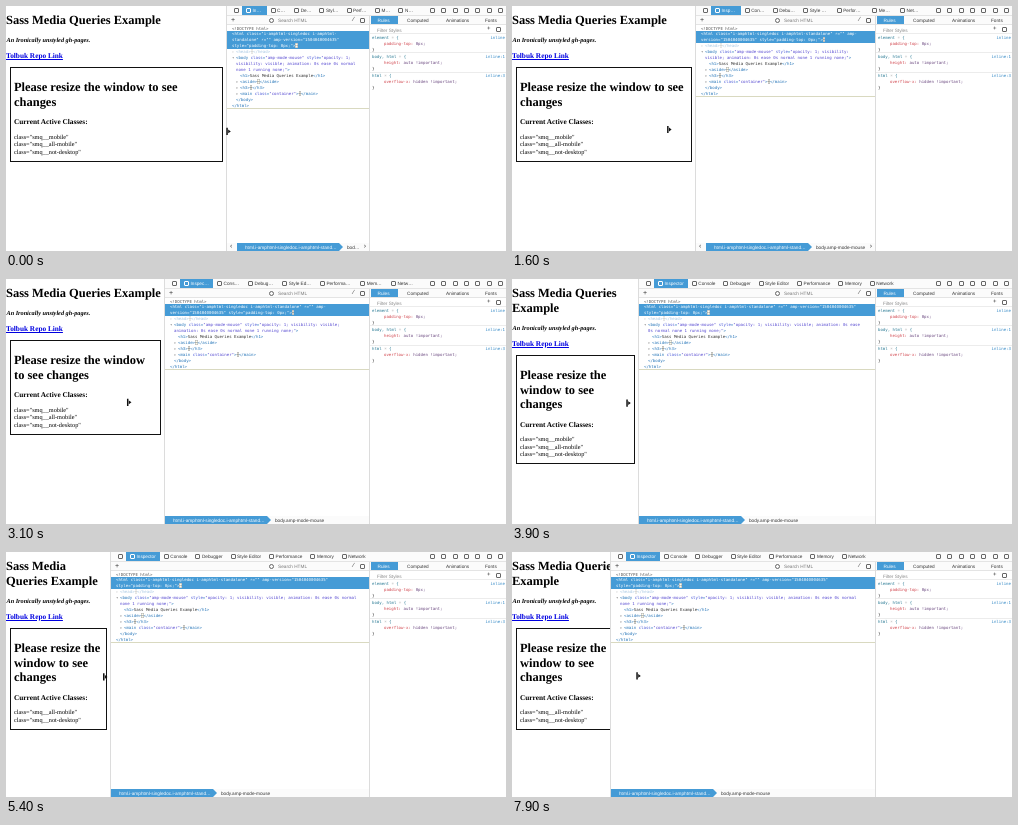
Recreate the animation shown at these times as an HTML page. Size 500 px wide and 245 px high, loop 8 s.

```html
<!DOCTYPE html>
<html lang="en">
<head>
<meta charset="utf-8">
<title>Resizing a page beside the inspector</title>
<style>
  html, body { margin: 0; width: 100%; height: 100%; overflow: hidden; background: #fff; }
  *, *::before { box-sizing: border-box; }
  #stage { position: absolute; left: 0; top: 0; width: 500px; height: 245px; overflow: hidden; background: #fff; text-rendering: geometricPrecision; }

  #page { position: absolute; left: 0; top: 0; color: #000; font: 6.24px/7.4px "Liberation Serif", serif; }
  #page h1, #page h2, #page h3, #page h4 { margin: 0; }
  #page h1, #page h2 { font-size: 12.48px; line-height: 14.7px; }
  #page h1 { padding-top: 7.1px; }
  #page h3, #page h4 { line-height: 8.4px; white-space: nowrap; }
  #page h3 { font-size: 7.3px; }
  #page h4 { font-size: 6.24px; font-style: italic; padding: 9.4px 0 6.7px .5px; }
  #page a { color: #0000e0; text-decoration: underline; }
  #box { margin: 6.6px 3.2px 0 4px; padding: 11.9px 3px 4.5px; border: 1px solid #111; }
  #box h3 { margin: 8.9px 0 7px; }
  #box div { white-space: nowrap; }

  #tools { position: absolute; top: 0; right: 0; height: 245px; background: #fff; border-left: 1px solid #dcdcdc; font: 4.7px/7px "Liberation Sans", Arial, sans-serif; color: #333; overflow: hidden; }
  #tools div { position: absolute; white-space: nowrap; }
  #tools .bar { left: 0; right: 0; background: #fbfbfb; border-bottom: 1px solid #e4e4e4; }
  #tools .tabs { left: 15px; right: 88px; top: 0; height: 9px; display: flex; }
  #tools .tab { position: relative; flex: 0 1 auto; min-width: 0; height: 9px; padding: 1px 4px 0 10.5px; overflow: hidden; text-overflow: ellipsis; }
  .tab::before { content: ""; position: absolute; left: 4px; top: 2px; width: 5px; height: 5px; border: 1px solid #666; border-radius: 1px; }
  #tools .on { background: #459bd6; color: #fff; }
  .tab.on::before { border-color: #fff; }
  .icon { width: 5px; height: 5px; border: 1px solid #666; border-radius: 1px; }

  #tools .code { left: 0; right: 137px; top: 19px; box-shadow: inset 0 -1px #d9d9c0; }
  #tools .mono { font: 4.05px/6px "DejaVu Sans Mono", "Liberation Mono", monospace; }
  #tools .row { position: relative; white-space: normal; padding-right: 9.5px; color: #2474b8; }
  .row i { font-style: normal; color: #4a58d8; }
  .row b { font-weight: normal; color: #5548d0; }
  .row u, #tools .solo { text-decoration: none; white-space: nowrap; }
  #tools .sel, .sel i, .sel b { color: #fff; }
  .row em { font-style: normal; color: #555; background: #fffff0; box-shadow: inset 0 0 0 .5px #aaa; }
  .row s { position: absolute; margin-left: -4px; text-decoration: none; color: #888; }

  #tools .rules { left: auto; right: 0; width: 137px; top: 10px; bottom: 0; background: #fff; border-left: 1px solid #dcdcdc; }
  .rules .sub { top: 1px; }
  .rules .line { left: 0; right: 0; height: 1px; background: #ececec; }
  .rules .prop { color: #d0444c; }
  .rules .prop span { color: #6c4a80; }
  .rules .pick { color: #2a7a94; }
  .rules .src { right: 1px; color: #2f86c4; }

  #tools .crumbs { left: 0; right: 137px; top: 237px; height: 8px; background: #fbfbfb; }
  #tools #trail { top: 0; right: 9px; height: 8px; overflow: hidden; }
  #tools .crumb { left: 0; top: 0; width: 106px; height: 8px; padding: 1px 4px 0 8px; clip-path: polygon(0 0, 102px 0, 106px 4px, 102px 8px, 0 8px); }
  #tools .crumb span, #tools .next { overflow: hidden; text-overflow: ellipsis; }
  #tools .crumb span { display: block; }
  #tools .next { left: 110px; right: 0; top: 1px; }
  #cursor { position: absolute; left: -3px; top: -4px; }
</style>
</head>
<body>
<div id="stage">
  <div id="page">
    <h1>Sass Media Queries Example</h1>
    <h4>An Ironically unstyled gh-pages.</h4>
    <h3><a>Tolbuk Repo Link</a></h3>
    <div id="box">
      <h2>Please resize the window to see changes</h2>
      <h3>Current Active Classes:</h3>
      <div id="mobile">class="smq__mobile"</div>
      <div>class="smq__all-mobile"</div>
      <div>class="smq__not-desktop"</div>
    </div>
  </div>

  <div id="tools">
    <div class="bar" style="top:0;height:10px"></div>
    <div class="bar" style="top:10px;height:9px"></div>
    <div class="icon" style="left:7px;top:2px"></div>
    <div class="tabs" id="tabs"></div>
    <div style="left:4px;top:11px;font-size:7px">+</div>
    <div style="right:199px;top:11px;color:#777">Search HTML</div>
    <div class="icon" style="right:232px;top:12px;border-radius:50%"></div>
    <div style="right:152px;top:11px;font-size:6px">⁄</div>
    <div class="icon" style="right:141px;top:12px"></div>

    <div class="code mono" id="code"></div>

    <div class="crumbs">
      <div id="prev" style="left:3px;top:0;font-size:7px">‹</div>
      <div id="trail">
        <div class="crumb on"><span>html.i-amphtml-singledoc.i-amphtml-standalone</span></div>
        <div class="next">body.amp-mode-mouse</div>
      </div>
      <div id="more" style="right:3px;top:0;font-size:7px">›</div>
    </div>

    <div class="rules" id="rules">
      <div class="bar" style="top:0;height:9px"></div>
      <div class="on" style="left:1px;top:0;width:27px;height:8px"></div>
      <div class="sub" style="left:7.5px;color:#fff">Rules</div>
      <div class="sub" style="left:37px">Computed</div>
      <div class="sub" style="left:76px">Animations</div>
      <div class="sub" style="left:115px">Fonts</div>
      <div style="left:7px;top:11px;color:#888">Filter Styles</div>
      <div style="left:117px;top:10px;font-size:6px">+</div>
      <div class="icon" style="left:126px;top:11px"></div>
      <div class="line" style="top:17px"></div>
      <div class="line" style="top:36px"></div>
      <div class="line" style="top:56px"></div>
    </div>
  </div>

  <svg id="cursor" width="8" height="9" viewBox="0 0 8 9">
    <path d="M2.3 .8h1.5v7.2H2.3zM4.2 2.5L6.8 4.4 4.2 6.3z" fill="#111"/>
  </svg>
</div>

<script>
const $ = id => document.getElementById(id);
const LOOP = 8000, STEP = 100;

const addDiv = (parent, cls, html, style = "") => {
  const el = document.createElement("div");
  el.className = cls;
  el.innerHTML = html;
  el.style.cssText = style;
  parent.append(el);
  return el;
};

["Inspector", "Console", "Debugger", "Style Editor", "Performance", "Memory", "Network"]
  .forEach((name, i) => addDiv($("tabs"), i ? "tab" : "tab on", name));
for (let i = 0; i < 7; i++)
  addDiv($("tools"), "icon", "", `right:${Math.round(3 + i * 11.3)}px;top:2px`);

// Markup tree rows: indent, markup, classes, extra style
const attr = (name, value) => `<i>${name}</i>=<b>"${value}"</b>`;
const folded = tag => `<s>▸</s>&lt;${tag}&gt;<em>⋯</em>&lt;/${tag}&gt;`;
const rows = [
  [6, "&lt;!DOCTYPE html&gt;", "solo", "height:6.4px;padding-top:.6px;color:#555"],
  [6, `&lt;html ${attr("class", "i-amphtml-singledoc i-amphtml-standalone")} ${attr("⚡", "")} ${attr("amp-version", "1504040004635")} <i><u>style="padding-top:</u> 0px;"</i>&gt;<em>⋯</em>`, "sel on"],
  [10, folded("head"), "solo", "opacity:.4"],
  [10, `<s>▾</s>&lt;body ${attr("class", "amp-mode-mouse")} ${attr("style", "opacity: 1; visibility: visible; animation: 0s ease 0s normal none&nbsp;1 running none;")}&gt;`, ""],
  [14, "&lt;h1&gt;<span style='color:#333'>Sass Media Queries Example</span>&lt;/h1&gt;", "solo"],
  [14, folded("aside"), "solo"],
  [14, folded("h3"), "solo"],
  [14, `<s>▸</s>&lt;main ${attr("class", "container")}&gt;<em>⋯</em>&lt;/main&gt;`, "solo"],
  [10, "&lt;/body&gt;", "solo"],
  [6, "&lt;/html&gt;", "solo"]
];
rows.forEach(([indent, html, cls, style = ""]) =>
  addDiv($("code"), `row ${cls}`, html, `padding-left:${indent - 1}px;${style}`));

// Style rules: top, selector, property, value, place
const rules = [
  [18.5, "element", "padding-top:", "0px;", "inline"],
  [37.6, "body, html", "height:", "auto !important;", "inline:1"],
  [57, "html", "overflow-x:", "hidden !important;", "inline:3"]
];
rules.forEach(([top, pick, prop, value, place]) => {
  const line = (cls, html, left, dy) =>
    addDiv($("rules"), `mono ${cls}`, html, (left === null ? "" : `left:${left}px;`) + `top:${top + dy}px`);
  line("pick", `${pick} <span style="color:#999">☼</span> {`, 2, 0);
  line("src", place, null, 0);
  line("prop", `${prop} <span>${value}</span>`, 14, 6.2);
  line("", "}", 2, 12.4);
});

// Each track is a list of [time, value]
const tracks = {
  split: [[0, 220], [800, 189], [1800, 181], [2700, 174], [3900, 126], [4700, 111], [6300, 95], [7200, 95], [7900, 98]],
  width: [[0, 220], [800, 189], [1800, 181], [2700, 174], [3900, 126], [4700, 111], [6300, 95], [6900, 95], [7200, 112], [7900, 112]],
  curX: [[0, 221], [800, 179], [1800, 150], [2700, 125], [3900, 115], [4700, 99], [6900, 95], [7900, 125]],
  curY: [[0, 125], [800, 123.5], [2700, 122.5], [4700, 124.5], [6900, 124.5], [7900, 123.5]]
};

function at(track, t) {
  const i = track.findIndex(k => k[0] > t);
  if (i < 0) return track[track.length - 1][1];
  const [t0, a] = track[i - 1], [t1, b] = track[i];
  return a + (b - a) * (t - t0) / (t1 - t0);
}

function draw(t) {
  const split = Math.round(at(tracks.split, t));
  const width = Math.round(at(tracks.width, t));
  const scrolls = split > 180;
  $("page").style.width = width + "px";
  $("tools").style.width = 500 - split + "px";
  $("mobile").style.display = width > 120 ? "" : "none";
  $("trail").style.left = (scrolls ? 10 : 0) + "px";
  $("prev").style.display = $("more").style.display = scrolls ? "" : "none";
  $("cursor").style.transform = `translate(${at(tracks.curX, t)}px, ${at(tracks.curY, t)}px)`;
}

const start = performance.now();
function tick() {
  const t = (performance.now() - start) % LOOP;
  draw(Math.floor(t / STEP) * STEP);
  requestAnimationFrame(tick);
}
draw(0);
requestAnimationFrame(tick);
</script>
</body>
</html>
```
